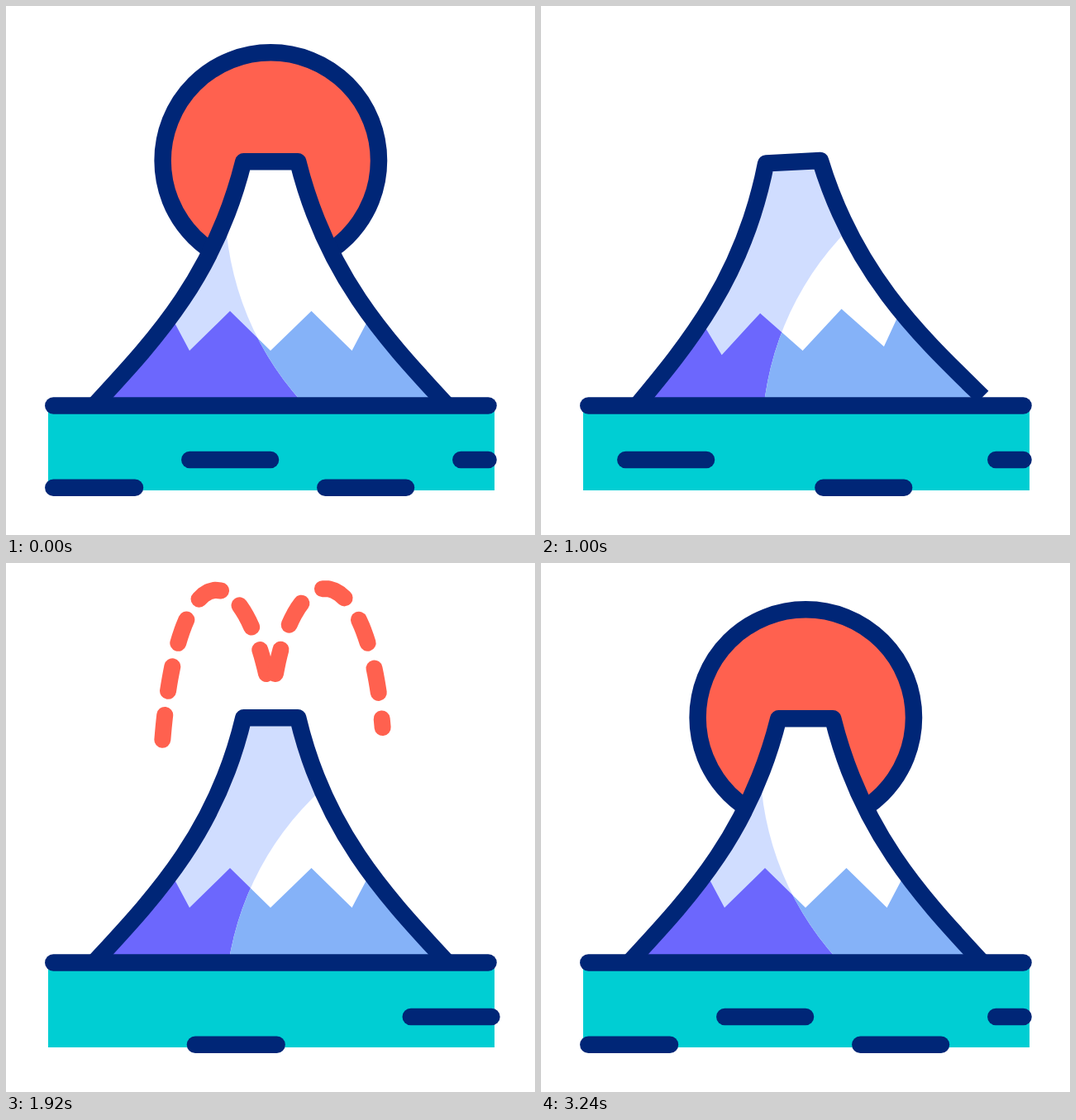
Recreate the animation shown at these times as an HTML page. Size 640 px wide and 640 px high, loop 3.64 s.

```html
<!DOCTYPE html>
<html lang="en">
<head>
<meta charset="utf-8">
<title>Volcano</title>
<style>
  html, body { margin: 0; width: 100%; height: 100%; overflow: hidden; background: #fff; }
  svg { display: block; width: 100vw; height: 100vh; }
  .line { fill: none; stroke: #002677; stroke-width: 20.5; stroke-linecap: round; stroke-linejoin: round; }
  .lava { fill: none; stroke: #ff614f; stroke-width: 20; stroke-linecap: round; stroke-linejoin: round; }
</style>
</head>
<body>
<svg viewBox="0 0 640 640">
  <defs>
    <clipPath id="sky"><rect width="640" height="484"/></clipPath>
    <clipPath id="slopes"><path id="body"/></clipPath>
    <clipPath id="lit"><circle id="light" cx="624" r="359"/></clipPath>
    <path id="foot" d="M190 357L222 417L271 369L320 417L369.5 369L418.5 417L450 357L640 500H0Z"/>
  </defs>

  <g clip-path="url(#sky)">
    <circle id="sun" class="line" cx="320.3" r="130.7" style="fill:#ff614f"/>
  </g>

  <path id="lavaLeft" class="lava"/>
  <path id="lavaRight" class="lava"/>

  <g id="mountain">
    <g clip-path="url(#slopes)">
      <rect width="640" height="500" fill="#d0ddff"/>
      <use href="#foot" fill="#6c67fd"/>
      <g clip-path="url(#lit)">
        <rect width="640" height="500" fill="#fff"/>
        <use href="#foot" fill="#85b2f8"/>
      </g>
    </g>
    <path id="outline" class="line" style="stroke-linecap:butt"/>
  </g>

  <rect x="51" y="484" width="540" height="102" fill="#00ced3"/>
  <path class="line" d="M57.3 483.5H583.5"/>
  <g id="waves"></g>
</svg>

<script>
const LOOP = 3640, STEP = 40;
const NS = 'http://www.w3.org/2000/svg';
const $ = id => document.getElementById(id);
const clamp = v => Math.min(1, Math.max(0, v));
const progress = (t, start, end) => clamp((t - start) / (end - start));
const smooth = u => u * u * (3 - 2 * u);
const easeOut = u => 1 - (1 - u) ** 2;
const glide = u => 1 - (1 - u ** 1.5) ** 2.8;
const mix = (a, b, u) => a + (b - a) * u;

// Each end: resting x, time it leaves, time it is back.
const waves = [
  { y: 582.7, ends: [[57.3, 540, 2355], [156, 540, 2355]] },
  { y: 549, ends: [[222.3, 673, 2463], [320, 673, 2463]] },
  { y: 582.7, ends: [[386.3, 800, 2613], [484, 800, 2613]] },
  { y: 549, ends: [[550.3, 1002, 2730], [583.5, 1058, 2850]] }
];
for (const wave of waves) {
  wave.node = document.createElementNS(NS, 'path');
  wave.node.setAttribute('class', 'line');
  $('waves').append(wave.node);
}

function drawWave({ node, y, ends }, t) {
  const turn = (ends[0][1] + ends[0][2]) / 2;
  const [a, b] = ends.map(([x, leave, back]) => t < turn
    ? x - 0.001122 * Math.max(0, t - leave) ** 2
    : x + 0.000907 * Math.max(0, back - t) ** 2);
  node.setAttribute('d', `M${a} ${y}H${b}`);
}

const DASH = 30, PERIOD = 59;
function makeLava(id, d, start) {
  const track = document.createElementNS(NS, 'path');
  track.setAttribute('d', d);
  const length = track.getTotalLength();
  const count = Math.round((length - DASH) / PERIOD);
  return { node: $(id), track, length, start, count, period: (length - DASH) / count };
}
const lavas = [
  makeLava('lavaLeft', 'M315 134C280 -20 196 -17 186 273', 1590),
  makeLava('lavaRight', 'M326 134C355 -30 458 -10 459 280', 1645)
];

function drawLava({ node, track, length, start, count, period }, t) {
  const head = length * easeOut(progress(t, start, start + 500));
  const tail = length * easeOut(progress(t, start + 385, start + 885));
  let d = '';
  for (let i = 0; i <= count; i++) {
    const from = Math.max(tail, i * period);
    const to = Math.min(head, i * period + DASH);
    if (to - from < 0.5) continue;
    for (let k = 0; k <= 4; k++) {
      const p = track.getPointAtLength(mix(from, to, k / 4));
      d += `${k ? 'L' : 'M'}${p.x} ${p.y}`;
    }
  }
  node.setAttribute('d', d);
}

function mountainPath(stretch) {
  const x = mix(287.3, 288.7, stretch), y = mix(188.3, 162.7, stretch);
  const cx = mix(252, 301, stretch), cy = mix(330, 290, stretch);
  const flip = v => 640.5 - v;
  return `M106 484C176 408 ${cx} ${cy} ${x} ${y}H${flip(x)}` +
    `C${flip(cx)} ${cy} ${flip(176)} 408 ${flip(106)} 484`;
}

function draw(t) {
  const drop = 301 * (glide(progress(t, 0, 820)) - glide(progress(t, 2240, 3240)));
  $('sun').setAttribute('cy', 187 + drop);
  $('light').setAttribute('cy', 238 + drop);

  // Three tremors, then the crater stretches for the eruption.
  const tremor = progress(t, 495, 1168.5);
  const tilt = -2.95 * Math.sin(tremor * 6 * Math.PI);
  $('mountain').setAttribute('transform', `rotate(${tilt} 320 484)`);
  const stretch = smooth(progress(t, 1300, 1580)) - smooth(progress(t, 1640, 1960));
  const d = mountainPath(stretch);
  $('body').setAttribute('d', d + 'Z');
  $('outline').setAttribute('d', d);

  lavas.forEach(lava => drawLava(lava, t));
  waves.forEach(wave => drawWave(wave, t));
}

const begin = performance.now();
function tick() {
  const t = (performance.now() - begin) % LOOP;
  draw(Math.floor(t / STEP) * STEP);
  requestAnimationFrame(tick);
}
tick();
</script>
</body>
</html>
```
